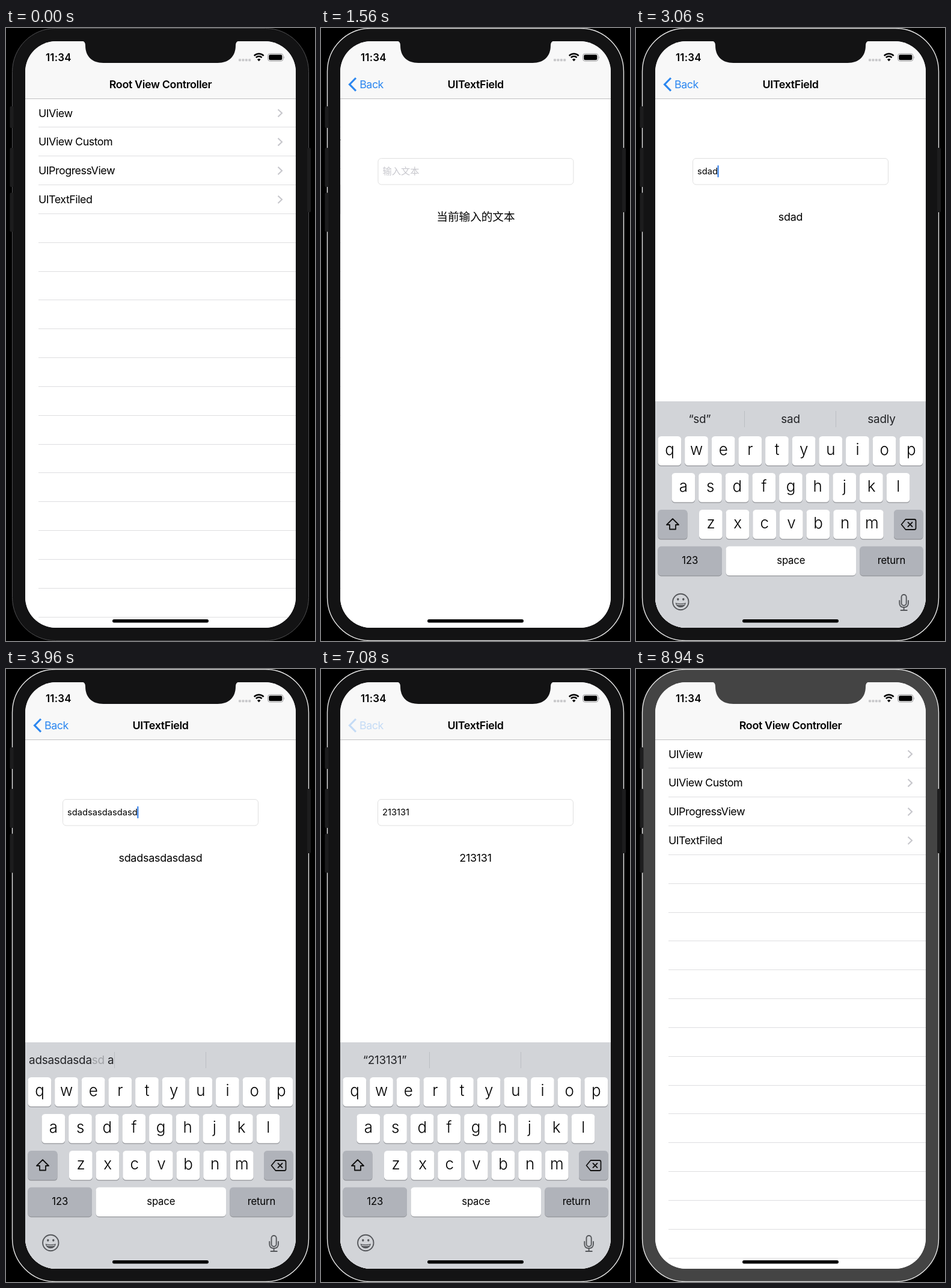
Animation, 514 px wide and 1018 px high, one loop 9 s. Source, as an HTML page:

```html
<!DOCTYPE html>
<html lang="en">
<head>
<meta charset="utf-8">
<title>Text field demo</title>
<style>
  html, body { margin: 0; width: 100%; height: 100%; overflow: hidden; background: #000; }
  svg { display: block; width: 514px; height: 1018px; }
  text { font-family: Inter, "Noto Sans CJK SC", "Noto Sans CJK", sans-serif; white-space: pre; }
</style>
</head>
<body>
<svg id="stage" viewBox="0 0 514 1018" xmlns="http://www.w3.org/2000/svg">
  <defs><clipPath id="glass"><rect x="32" y="22" width="450" height="974" rx="51"/></clipPath></defs>
</svg>
<script>
const LOOP = 9000, STEP = 60;
const PUSH = 900, FOCUS = 2100, POP = 7140;
const WORD = "sdadsasdasdasd", DIGITS = "213131";
const TYPE = { start: 2760, gap: 85 }, ERASE = { start: 4380, gap: 72 }, COUNT = { start: 5700, gap: 160 };
const BLUE = "#2c87f0";
const stage = document.getElementById("stage");

function add(parent, tag, attrs = {}) {
  const node = document.createElementNS("http://www.w3.org/2000/svg", tag);
  set(node, attrs);
  parent.appendChild(node);
  return node;
}
function set(node, attrs) {
  for (const key in attrs) node.setAttribute(key, attrs[key]);
}
const group = (parent, attrs) => add(parent, "g", attrs);
const path = (parent, d, attrs) => add(parent, "path", { d, fill: "none", ...attrs });
const box = (parent, x, y, width, height, fill, attrs) =>
  add(parent, "rect", { x, y, width, height, fill, ...attrs });
function label(parent, str, x, y, size, attrs = {}) {
  const node = add(parent, "text", { x, y, "font-size": size, "letter-spacing": "-.028em", ...attrs });
  node.textContent = str;
  return node;
}
const MID = { "text-anchor": "middle" };
const BOLD = { ...MID, "font-weight": 600, "letter-spacing": "-.02em" };
const HAN = { "font-weight": 350, "letter-spacing": 0 };

// Phone body
const body = box(stage, 10.5, .5, 493, 1017, "#131314", { rx: 72 });
const buttons = [[6.5, 130, 36], [6.5, 199, 65], [6.5, 273.5, 65], [501, 199, 107]];
for (const [x, y, h] of buttons) box(stage, x, y, 6, h, "#1d1d1e", { rx: 2 });
const screen = group(stage, { "clip-path": "url(#glass)" });
box(screen, 32, 22, 450, 974, "#fff");

// List page
const list = group(screen);
box(list, 32, 118, 450, 878, "#fff");
const ROW = 47.83, TOP = 117.65;
const picked = box(list, 32, TOP + 3 * ROW, 450, ROW, "#d9d9d9");
for (let i = 1; i <= 18; i++) box(list, 54, Math.round(TOP + i * ROW) - 1, 428, 1, "#dedee0");
["UIView", "UIView Custom", "UIProgressView", "UITextFiled"].forEach((name, i) => {
  const y = TOP + i * ROW;
  label(list, name, 54, y + 30, 17.9);
  path(list, `M452.5 ${y + 17.5}l6.5 6.2l-6.5 6.2`, { stroke: "#c7c7cc", "stroke-width": 2.1 });
});
const dim = box(list, 32, 118, 450, 878, "#000");

// Text field page
const page = group(screen);
box(page, 32, 118, 450, 878, "#fff");
box(page, 94.5, 216.5, 325, 43.5, "#fff", { rx: 5.5, stroke: "#dfdfdf" });
const hint = label(page, "输入文本", 102, 242.8, 15.25, { ...HAN, fill: "#c7c7cd" });
const entry = label(page, "", 102, 243.3, 14.7, { "letter-spacing": 0 });
const caret = box(page, 101.5, 228, 2.2, 20, "#3a84ec", { rx: 1 });
const prompt = label(page, "当前输入的文本", 257, 319.8, 18.6, { ...MID, ...HAN });
const echo = label(page, "", 257, 320, 17.9, { ...MID, "letter-spacing": "-.012em" });

// Navigation bar
const bar = group(screen);
box(bar, 32, 22, 450, 95.5, "#f8f8f8");
box(bar, 32, 117, 450, 1, "#bfbfc1");
const rootTitle = label(bar, "Root View Controller", 257, 100.3, 17.9, BOLD);
const fieldTitle = label(bar, "UITextField", 257, 100.3, 17.9, BOLD);
const back = group(bar);
path(back, "M58 83L47.5 93.7L58 104.4", { stroke: BLUE, "stroke-width": 3.1 });
const backText = label(back, "Back", 64, 100.3, 17.9, { fill: BLUE });

// Status bar
label(screen, "11:34", 66, 55, 16.9, { "font-weight": 600, "letter-spacing": ".2px" });
for (let i = 0; i < 4; i++) box(screen, 387 + i * 5.4, 51.2, 4, 4, "#c9c9cb", { rx: 1 });
for (const r of [11, 6.8]) {
  const s = r * .72;
  path(screen, `M${420.7 - s} ${54 - s}A${r} ${r} 0 0 1 ${420.7 + s} ${54 - s}`,
    { stroke: "#000", "stroke-width": 2.5 });
}
path(screen, "M420.7 55.3L417.9 52.3A4 4 0 0 1 423.5 52.3Z", { fill: "#000" });
box(screen, 435.5, 42.5, 25.5, 12.5, "none", { rx: 3.8, stroke: "#9b9b9d" });
box(screen, 437.2, 44.2, 22.1, 9.1, "#000", { rx: 2.2 });
path(screen, "M462.3 46.5Q464 48.7 462.3 51Z", { fill: "#9b9b9d" });

// Keyboard
const keyboard = group(screen);
box(keyboard, 32, 620, 450, 390, "#d2d4d8");
for (const x of [180, 332]) box(keyboard, x, 636, 1, 27, "#bbbec3");
const SLOTS = [106, 257, 408.5];
const slots = SLOTS.map(x =>
  label(keyboard, "", x, 655.7, 18.9, { ...MID, "letter-spacing": "-.012em" }));

function key(x, y, w, str, size, fill = "#fff", baseline = 29, weight = 400) {
  box(keyboard, x, y + 1.2, w, 48.5, "#919398", { rx: 5.3 });
  box(keyboard, x, y, w, 48.5, fill, { rx: 5.3 });
  if (str) label(keyboard, str, x + w / 2, y + baseline, size,
    { ...MID, "font-weight": weight, "letter-spacing": "-.01em" });
}
const GREY = "#b0b3ba";
[["qwertyuiop", 36.5, 678], ["asdfghjkl", 59.5, 739], ["zxcvbnm", 105, 800]].forEach(([letters, x, y]) =>
  [...letters].forEach((c, i) => key(x + i * 44.65, y, 38.7, c, 26, "#fff", 31.3, 350)));
key(36.5, 800, 49, "", 0, GREY);
key(429, 800, 48.5, "", 0, GREY);
key(36.5, 860.7, 106.5, "123", 16.7, GREY);
key(149.5, 860.7, 216.5, "space", 16.7);
key(372.3, 860.7, 105.2, "return", 16.7, GREY);
const ink = { stroke: "#111", "stroke-width": 1.8, "stroke-linejoin": "round", "stroke-linecap": "round" };
path(keyboard, "M61 815L71 825H66V832.5H56V825H51Z", ink);
path(keyboard, "M448.5 816H463Q465.5 816 465.5 818.5V830.5Q465.5 833 463 833H448.5L441.5 824.5Z"
  + "M452.5 821l7 7m0-7l-7 7", ink);
const soft = { stroke: "#55575b", "stroke-width": 1.9, "stroke-linecap": "round" };
add(keyboard, "circle", { cx: 74.3, cy: 953, r: 13.2, fill: "none", ...soft });
for (const cx of [69.8, 78.8]) add(keyboard, "ellipse", { cx, cy: 948.8, rx: 1.7, ry: 2, fill: "#55575b" });
path(keyboard, "M65.5 954.5Q74.3 957 83 954.5Q81.5 962.2 74.3 962.2T65.5 954.5Z", { fill: "#55575b" });
path(keyboard, "M67.5 956.8Q74.3 958.6 81 956.8", { stroke: "#d2d4d8", "stroke-width": 1.2 });
box(keyboard, 441.5, 941, 8.2, 18, "none", { rx: 4.1, ...soft });
path(keyboard, "M438.3 951V955Q438.3 962 445.6 962T453 955V951M445.6 962V967M440.5 967H450.8", soft);

box(screen, 177, 982, 160, 5.4, "#000", { rx: 2.7 });
const notch = path(stage, "M124 21H126Q132 22 132 29C132 47 143 58 162 58H352C371 58 382 47 382 29Q382 22 388 21H390Z");

// Motion
const clamp = v => Math.max(0, Math.min(1, v));
function spring(ms, speed = 14) {
  const x = Math.max(0, ms) / 1000 * speed;
  return 1 - (1 + x) * Math.exp(-x);
}
const strokes = (t, run, max) =>
  Math.max(0, Math.min(max, Math.floor((t - run.start) / run.gap) + 1));

function typed(t) {
  if (t >= COUNT.start) return DIGITS.slice(0, strokes(t, COUNT, DIGITS.length));
  return WORD.slice(0, strokes(t, TYPE, WORD.length) - strokes(t, ERASE, WORD.length));
}

// Bars split each suggestion into dark and faded parts.
function suggestions(t) {
  const str = typed(t), n = str.length;
  if (!n) return ["I", "the", "I’m"];
  if (t >= COUNT.start) return [`“${str}”`, "", ""];
  if (n >= 12) return ["adsasdasda|sd| a", "", ""];
  if (n > 4) return [`“${str}”`, "", ""];
  return t > ERASE.start ? [`“${str}|”`, "sa|d", "sadl|y"] : [`“${str}”`, "sad", "sadly"];
}
function fillSlot(i, str) {
  const node = slots[i];
  if (node.dataset.str === str) return;
  node.dataset.str = str;
  node.textContent = "";
  str.split("|").forEach((part, k) => {
    add(node, "tspan", { fill: k % 2 ? "#a0a2a6" : "#222326" }).textContent = part;
  });
  // Long suggestions stay inside the left margin.
  set(node, { x: Math.max(SLOTS[i], 38 + node.getComputedTextLength() / 2) });
}

function caretOn(t) {
  if (t < FOCUS || t >= POP) return false;
  const ends = [[TYPE, WORD.length], [ERASE, WORD.length], [COUNT, DIGITS.length]];
  let last = FOCUS;
  for (const [run, n] of ends) {
    const end = run.start + run.gap * (n - 1);
    if (t >= run.start && t <= end) return true;
    if (t > end) last = end;
  }
  return (t - last) % 1000 < 500;
}

function render(t) {
  const shown = t < POP ? spring(t - PUSH) : 1 - spring(t - POP);
  const away = 450 * (1 - shown);
  const slide = (node, x, y = 0) => set(node, { transform: `translate(${x.toFixed(2)} ${y.toFixed(2)})` });
  const show = (node, on) => set(node, { visibility: on ? "inherit" : "hidden" });

  slide(list, -135 * shown);
  slide(page, away);
  show(page, shown > .002);
  set(dim, { opacity: .1 * shown });
  set(picked, { opacity: t < PUSH - 90 ? 0 : t < POP ? 1 : clamp(1 - (t - POP) / 450) });

  slide(rootTitle, -180 * shown);
  set(rootTitle, { opacity: clamp(1 - shown * 1.6) });
  slide(fieldTitle, 200 * (1 - shown));
  set(fieldTitle, { opacity: clamp(shown * 1.6 - .6) });
  slide(backText, 130 * (1 - shown));
  const pressed = t >= POP - 120 ? .25 : 1;
  set(back, { opacity: clamp(shown * 1.6 - .6) * pressed });

  const rise = spring(t - FOCUS, 15.3);
  slide(keyboard, t >= POP ? away : 0, 376 * (1 - rise));
  show(keyboard, t > FOCUS && shown > .002);
  suggestions(t - 200).forEach((str, i) => fillSlot(i, str));

  const str = typed(t);
  entry.textContent = str;
  echo.textContent = str;
  show(prompt, t < TYPE.start);
  show(hint, !str);
  set(caret, { x: 101.5 + (str ? entry.getComputedTextLength() : 0) });
  show(caret, caretOn(t));

  const shell = t >= 8700 ? "#444" : "#131314";
  const darkRim = t < 960 || (t >= 1980 && t < 2940);
  set(body, { fill: shell, stroke: darkRim ? "#505052" : "#e8e8e8", "stroke-width": darkRim ? 1 : 1.4 });
  set(notch, { fill: shell });
}

const origin = performance.now();
function frame() {
  const t = (performance.now() - origin) % LOOP;
  render(Math.floor(t / STEP) * STEP);
  requestAnimationFrame(frame);
}
render(0);
requestAnimationFrame(frame);
</script>
</body>
</html>
```
